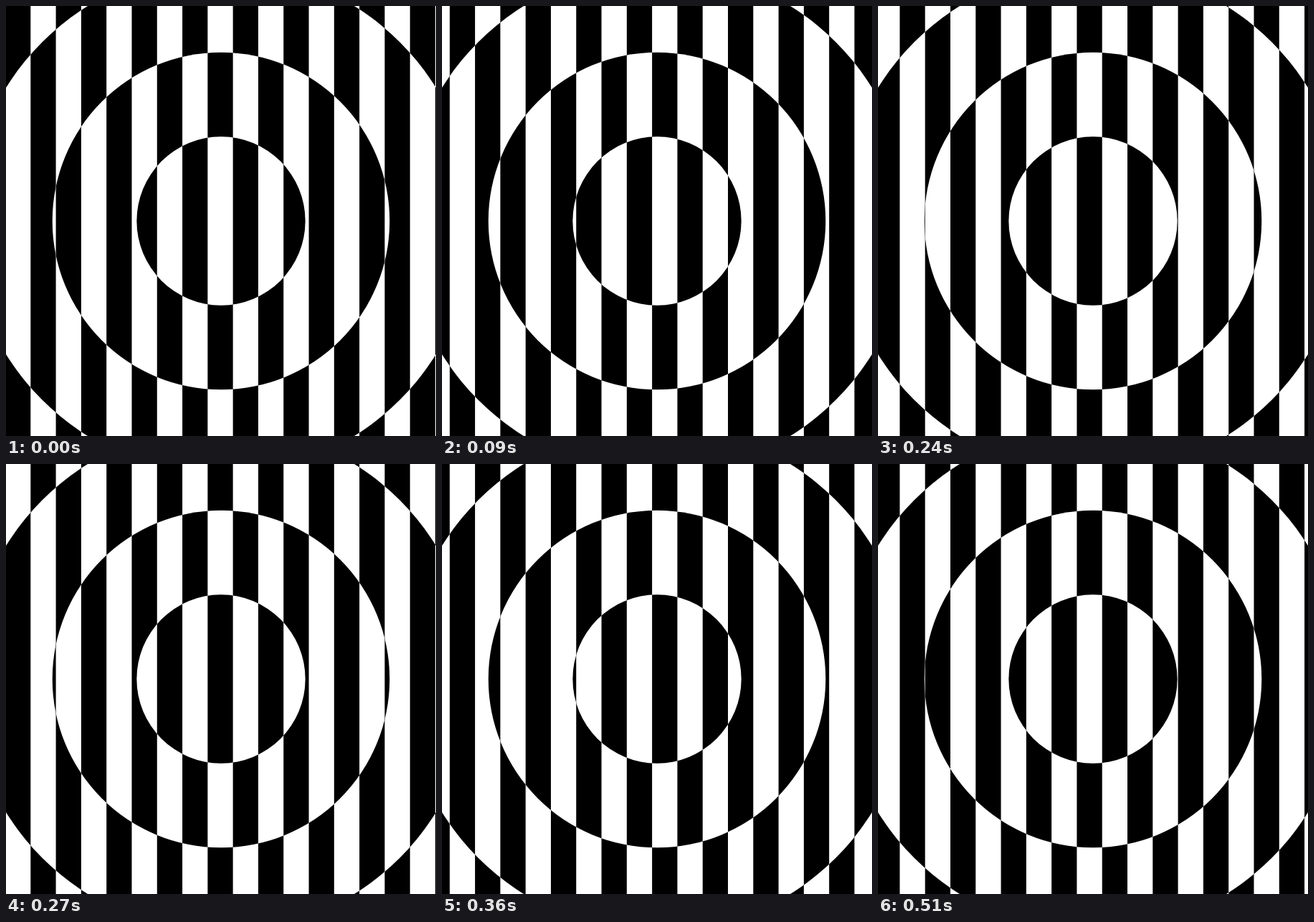
An HTML page that plays this animation: 600 by 600 pixels, repeating every 540 ms.

```html
<!DOCTYPE html>
<html lang="en">
<head>
<meta charset="utf-8">
<title>Stripes and rings</title>
<style>
  html, body { margin: 0; width: 100%; height: 100%; overflow: hidden; background: #fff; }
  svg { display: block; width: 100vw; height: 100vh; isolation: isolate; }
  .stripes {
    stroke: #000;
    stroke-width: 17;
    stroke-dasharray: 1 1;
    animation: slide 540ms steps(18) infinite;
  }
  .ring { fill: #fff; mix-blend-mode: difference; }
  @keyframes slide {
    from { stroke-dashoffset: 0; }
    to { stroke-dashoffset: -2; }
  }
</style>
</head>
<body>
<!-- one unit is one stripe -->
<svg viewBox="0 0 17 17">
  <rect width="17" height="17" fill="#fff"/>
  <path class="stripes" d="M-2.028 8.5H20"/>
  <circle class="ring" cx="8.5" cy="8.5" r="10"/>
  <circle class="ring" cx="8.5" cy="8.5" r="6.6667"/>
  <circle class="ring" cx="8.5" cy="8.5" r="3.3333"/>
</svg>
</body>
</html>
```
